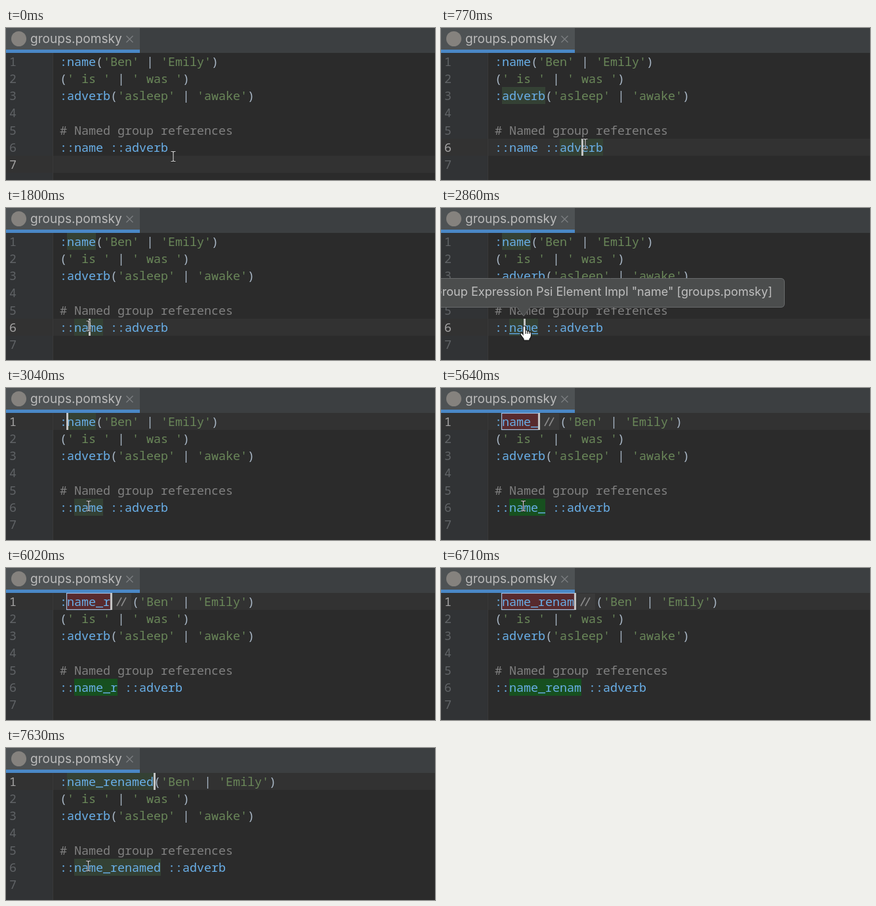
Write an HTML page with a canvas that moves like this. It is 654 px wide and 232 px high and loops after 8 s.

```html
<!DOCTYPE html>
<html lang="en">
<head>
<meta charset="utf-8">
<title>Rename a named group</title>
<style>
  html, body { margin: 0; width: 100%; height: 100%; overflow: hidden; background: #2b2b2b; }
  canvas { display: block; }
</style>
</head>
<body>
<canvas id="stage" width="654" height="232"></canvas>
<script>
const ctx = document.getElementById('stage').getContext('2d');
const LOOP = 8000, W = 654, H = 232;
const LEFT = 82, CELL = 11, TOP = 38, LINE = 26.15;
const MONO = '18.4px "Noto Sans Mono", "DejaVu Sans Mono", monospace';
const SANS = 'Inter, "Open Sans", sans-serif';
const C = {
  id: '#69afe8', str: '#6a8759', note: '#808080', punct: '#a9b7c6',
  caret: '#c4c4c4', usage: '#344134', mirror: '#17501f', edit: '#582a2e', select: '#214283'
};
const KEYS = [[5640, '_'], [6020, 'r'], [6200, 'e'], [6460, 'n'],
              [6580, 'a'], [6710, 'm'], [6840, 'e'], [7270, 'd']];

const col = n => LEFT + n * CELL;
const rowTop = r => Math.round(TOP + (r - 1) * LINE);
const baseline = r => Math.round(58 + (r - 1) * LINE);
const within = (t, a, b) => t >= a && t < b;

function rect(x, y, w, h, color) {
  ctx.fillStyle = color;
  ctx.fillRect(x, y, w, h);
}

function mark(x, r, chars, color) {
  rect(x, rowTop(r), chars * CELL, 26, color);
}

function label(s, x, y, size, color, align = 'left') {
  ctx.font = size + 'px ' + SANS;
  ctx.textAlign = align;
  ctx.fillStyle = color;
  ctx.fillText(s, x, y);
}

// One glyph per grid cell keeps the editor columns exact.
function mono(s, x, y, color) {
  ctx.font = MONO;
  ctx.textAlign = 'left';
  ctx.fillStyle = color;
  [...s].forEach((ch, i) => { if (ch !== ' ') ctx.fillText(ch, x + i * CELL, y); });
}

function code(s, r, x = LEFT) {
  for (const [part] of s.matchAll(/#.*|'[^']*'|[:\w]+|[^:\w'#]+/g)) {
    const color = part[0] === '#' ? C.note : part[0] === "'" ? C.str
      : /[:\w]/.test(part[0]) ? C.id : C.punct;
    mono(part, x, baseline(r), color);
    x += part.length * CELL;
  }
}

function tabBar() {
  rect(0, 0, W, TOP, '#3c3f41');
  rect(0, 0, 204, 33, '#4e5254');
  rect(0, 33, 204, 5, '#4a88c7');
  ctx.fillStyle = '#85827e';
  ctx.beginPath();
  ctx.arc(19.5, 16.5, 11.5, 0, 7);
  ctx.fill();
  label('groups.pomsky', 37, 23, 19.1, '#bbbbbb');
  ctx.strokeStyle = '#7b7e80';
  ctx.lineWidth = 1.4;
  ctx.beginPath();
  ctx.moveTo(183.5, 12); ctx.lineTo(193.5, 22);
  ctx.moveTo(193.5, 12); ctx.lineTo(183.5, 22);
  ctx.stroke();
}

function gutter(current) {
  rect(0, TOP, W, H - TOP, '#2b2b2b');
  rect(0, TOP, 71, H - TOP, '#313335');
  rect(0, rowTop(current), W, 26, '#323232');
  rect(71, TOP, 1, H - TOP, '#393939');
  for (let r = 1; r <= 7; r++) {
    mono(String(r), 5, baseline(r), r === current ? '#a4a3a3' : '#606366');
  }
}

function caret(x, r) {
  rect(x, rowTop(r), 3, 26, C.caret);
}

function hint(x) {
  rect(x + 3, 39, 29, 25, '#3a3a3a');
  ctx.strokeStyle = '#8a8a8a';
  ctx.lineWidth = 1.6;
  ctx.beginPath();
  for (const dx of [10, 17]) {
    ctx.moveTo(x + dx, 58);
    ctx.lineTo(x + dx + 7, 45);
  }
  ctx.stroke();
}

function popup() {
  ctx.beginPath();
  ctx.moveTo(-4, 107.5);
  ctx.lineTo(518, 107.5);
  ctx.quadraticCurveTo(523.5, 107.5, 523.5, 113);
  ctx.lineTo(523.5, 146);
  ctx.quadraticCurveTo(523.5, 151.5, 518, 151.5);
  ctx.lineTo(136, 151.5);
  ctx.lineTo(126, 165);
  ctx.lineTo(116, 151.5);
  ctx.lineTo(-4, 151.5);
  ctx.closePath();
  ctx.fillStyle = '#4b4d4d';
  ctx.fill();
  ctx.strokeStyle = '#686a6b';
  ctx.lineWidth = 1;
  ctx.stroke();
  label('Group Expression Psi Element Impl "name" [groups.pomsky]', 505, 134, 18.1, '#bfbfbf', 'right');
}

function beamPath(x, y) {
  ctx.beginPath();
  for (const s of [-1, 1]) {
    ctx.moveTo(x - 3.5, y + s * 7.5);
    ctx.lineTo(x - 1, y + s * 7.5);
    ctx.lineTo(x, y + s * 6.5);
    ctx.lineTo(x + 1, y + s * 7.5);
    ctx.lineTo(x + 3.5, y + s * 7.5);
  }
  ctx.moveTo(x, y - 6.5);
  ctx.lineTo(x, y + 6.5);
}

function beam(x, y) {
  beamPath(x, y);
  ctx.strokeStyle = '#222222';
  ctx.lineWidth = 2.6;
  ctx.stroke();
  ctx.strokeStyle = '#d0d0d0';
  ctx.lineWidth = 1.2;
  ctx.stroke();
}

function hand(x, y) {
  ctx.save();
  ctx.translate(x, y);
  ctx.fillStyle = '#ffffff';
  ctx.strokeStyle = '#111111';
  ctx.lineWidth = 1.2;
  ctx.beginPath();
  ctx.moveTo(-2, 13);
  ctx.lineTo(-2, 1.5);
  ctx.quadraticCurveTo(0, -1.5, 2, 1.5);
  ctx.lineTo(2, 7);
  ctx.quadraticCurveTo(4, 5.5, 5, 8);
  ctx.quadraticCurveTo(7, 6.8, 8, 9);
  ctx.quadraticCurveTo(10, 8, 10.5, 11);
  ctx.lineTo(10.5, 15);
  ctx.quadraticCurveTo(10, 18, 8, 20);
  ctx.lineTo(8, 22);
  ctx.lineTo(-1, 22);
  ctx.lineTo(-1, 20);
  ctx.lineTo(-6, 13);
  ctx.quadraticCurveTo(-6.5, 9.5, -3, 11.5);
  ctx.closePath();
  ctx.fill();
  ctx.stroke();
  ctx.beginPath();
  for (const dx of [2, 5, 8]) {
    ctx.moveTo(dx, 8);
    ctx.lineTo(dx, 12);
  }
  ctx.stroke();
  ctx.restore();
}

function glide(t, a, b, from, to) {
  const p = t < a ? 0 : t > b ? 1 : (t - a) / (b - a);
  const e = p * p * (3 - 2 * p);
  return from.map((v, i) => v + (to[i] - v) * e);
}

function pointer(t) {
  if (within(t, 5710, 7580)) return;
  if (within(t, 2360, 3040)) return hand(127, 180);
  const pos = t < 1000 ? glide(t, 60, 520, [255, 196], [220, 177])
    : t < 4170 ? glide(t, 1080, 1620, [220, 177], [126, 180]) : [125.5, 180];
  beam(...pos);
}

function draw(t) {
  const name = 'name' + KEYS.filter(k => t >= k[0]).map(k => k[1]).join('');
  const end = col(1 + name.length);
  const renaming = within(t, 4370, 7580);
  const row = t < 720 ? 7 : t < 2990 ? 6 : 1;

  gutter(row);

  if (within(t, 770, 1800)) {
    mark(col(1), 3, 6, C.usage);
    mark(col(9), 6, 6, C.usage);
  } else if (renaming) {
    mark(col(1), 1, name.length, t < 5000 ? C.select : C.edit);
    mark(col(2), 6, name.length, C.mirror);
  } else if (t >= 1800) {
    mark(col(1), 1, name.length, C.usage);
    mark(col(2), 6, name.length, C.usage);
  }

  code(':' + name, 1);
  if (renaming) hint(end);
  code("('Ben' | 'Emily')", 1, end + (renaming ? 33 : 0));
  code("(' is ' | ' was ')", 2);
  code(":adverb('asleep' | 'awake')", 3);
  code('# Named group references', 5);
  code('::' + name + ' ::adverb', 6);

  if (renaming) {
    ctx.strokeStyle = '#a5bfe0';
    ctx.lineWidth = 1.2;
    ctx.strokeRect(col(1) - 0.5, 38.5, name.length * CELL + 1, 25);
  }
  if (within(t, 2360, 3040)) rect(col(2), 191, 4 * CELL, 1.5, '#5c9fd8');

  if (within(t, 300, 720)) caret(col(0), 7);
  else if (within(t, 720, 1270)) caret(col(12), 6);
  else if (within(t, 1800, 2990)) caret(col(4), 6);
  else if (within(t, 2990, 3600) || within(t, 4100, 5000)) caret(col(1) - 1, 1);
  else if (t >= 5000) caret(end, 1);

  if (within(t, 2860, 2990)) popup();
  tabBar();
  pointer(t);
}

const start = performance.now();
function tick() {
  draw((performance.now() - start) % LOOP);
  requestAnimationFrame(tick);
}
tick();
</script>
</body>
</html>
```
